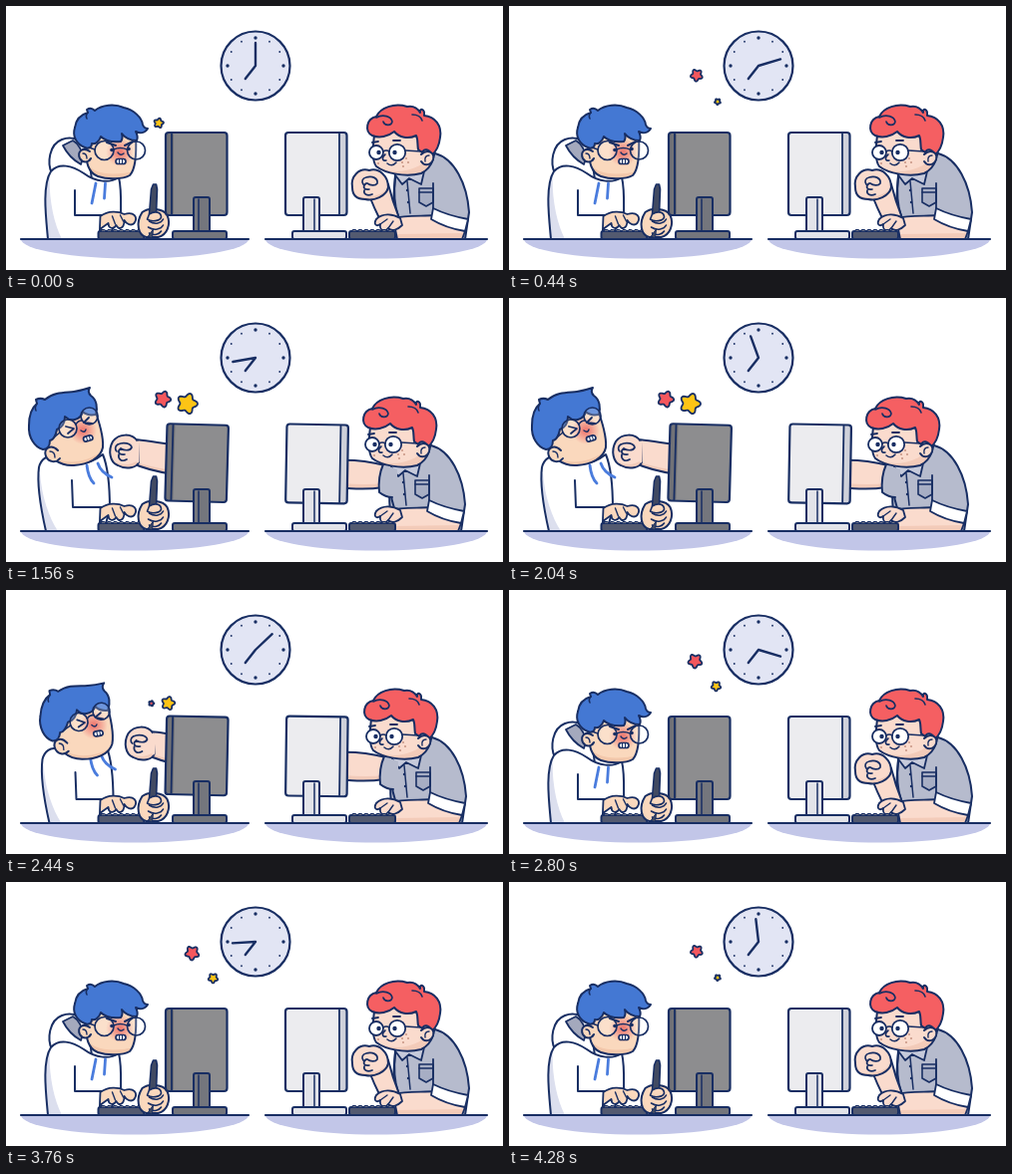
Animation, 498 px wide and 265 px high, one loop 4320 ms. Source, as an HTML page with a canvas:

```html
<!DOCTYPE html>
<html lang="en">
<head>
<meta charset="utf-8">
<title>Punch through the screen</title>
<style>
html,body{margin:0;width:100%;height:100%;overflow:hidden;background:#fff}
canvas{display:block;width:498px;height:265px}
</style>
</head>
<body>
<canvas id="stage"></canvas>
<script>
const W = 498, H = 265, LOOP = 4320, PUNCH = 480, STEP = 40;
const INK = '#182e63', SKIN = '#fad8bd', PALE = '#fadbcd', TAN = '#f4c8ab', ROSE = '#f3cbb9';
const BLUE = '#4478d3', RED = '#f55f62', SHIRT = '#b6bbcd';
const canvas = document.getElementById('stage');
const ctx = canvas.getContext('2d');
const dpr = window.devicePixelRatio || 1;
canvas.width = W * dpr;
canvas.height = H * dpr;
ctx.lineCap = ctx.lineJoin = 'round';

const cache = {};
const path = d => cache[d] || (cache[d] = new Path2D(d));

function paint(p, fill, width, color = INK) {
  if (fill) { ctx.fillStyle = fill; ctx.fill(p); }
  if (width) { ctx.strokeStyle = color; ctx.lineWidth = width; ctx.stroke(p); }
}
const shape = (d, fill, width = 2) => paint(path(d), fill, width);
const line = (d, width = 1.8, color = INK) => paint(path(d), null, width, color);

// Filled outline with a shadow kept inside it
function shaded(d, fill, shadow, tone, width = 2) {
  const p = path(d);
  paint(p, fill);
  ctx.save();
  ctx.clip(p);
  paint(path(shadow), tone);
  ctx.restore();
  paint(p, null, width);
}

function disc(x, y, r, fill, width = 0) {
  const p = new Path2D();
  p.arc(x, y, r, 0, 7);
  paint(p, fill, width);
}

function blush(x, y, r) {
  const g = ctx.createRadialGradient(x, y, 2, x, y, r);
  g.addColorStop(0, 'rgba(232,80,80,.65)');
  g.addColorStop(1, 'rgba(232,80,80,0)');
  disc(x, y, r, g);
}

function box(x, y, w, h, r, fill, width = 2) {
  const p = new Path2D();
  p.roundRect(x, y, w, h, r);
  paint(p, fill, width);
}

function group(dx, dy, deg, cx, cy, draw, stretch = 1) {
  ctx.save();
  ctx.translate(cx + dx, cy + dy);
  ctx.rotate(deg * Math.PI / 180);
  ctx.scale(1, stretch);
  ctx.translate(-cx, -cy);
  draw();
  ctx.restore();
}

// keys: [time, ...values], linear between neighbours
function at(keys, t) {
  let i = 0;
  while (i < keys.length - 2 && t > keys[i + 1][0]) i++;
  const a = keys[i], b = keys[i + 1];
  const k = Math.max(0, Math.min(1, (t - a[0]) / (b[0] - a[0])));
  return a.slice(1).map((v, j) => v + (b[j + 1] - v) * k);
}

const hitKeys = [[0, 0], [40, .75], [80, 1], [160, 1], [200, .9], [320, .1], [360, 0]];
const yellowKeys = [[0, 153, 117.5, 4.8], [120, 181.5, 106, 10.2], [260, 199, 99, 8.5], [400, 207.5, 96.5, 4.8], [440, 209, 96, 3], [480, 210, 96, 0]];
const redKeys = [[0, 140, 120, 0], [120, 157, 101.5, 8], [260, 176, 83, 8.5], [400, 186.5, 71.3, 7], [440, 188, 69.5, 6], [480, 190, 68, 4]];

function star(keys, t, fill, turn) {
  const [x, y, r] = at(keys, t);
  if (r < .5) return;
  const p = new Path2D();
  for (let i = 0; i <= 60; i++) {
    const a = i * Math.PI / 30;
    const d = r * (.86 + .17 * Math.cos(5 * a));
    p.lineTo(x + d * Math.sin(a + turn), y - d * Math.cos(a + turn));
  }
  p.closePath();
  paint(p, fill, 1.8);
}

function desk(x1, x2) {
  const p = new Path2D();
  p.ellipse((x1 + x2) / 2, 234, (x2 - x1) / 2, 19.5, 0, 0, Math.PI);
  paint(p, '#c2c6e8');
}

function clock(t) {
  disc(250, 60, 34.5, '#e2e5f4', 2.2);
  for (let i = 0; i < 12; i++) {
    const a = i * Math.PI / 6;
    disc(250 + 28 * Math.sin(a), 60 - 28 * Math.cos(a), i % 3 ? .9 : 1.7, INK);
  }
  const m = t * 4 * Math.PI / LOOP;
  const p = new Path2D('M250 60L239.8 73');
  p.moveTo(250, 60);
  p.lineTo(250 + 23 * Math.sin(m), 60 - 23 * Math.cos(m));
  paint(p, null, 2.4);
}

function keyboard(x) {
  box(x, 226, 46, 8, 2, '#535a70');
  for (let i = 0; i < 7; i++) box(x + 3 + i * 6, 224.5, 4, 2, 1, '#6d7387', 1);
}

// A hit pushes the panel over and foreshortens it
function monitor(x, edgeX, lineX, tones, hit, deg, squash) {
  group(1.5 * hit, 0, deg * hit, x + 30, 127, () => {
    box(x, 127, 61.5, 83, 3, tones[0], 0);
    box(edgeX, 127, 8, 83, 3, tones[1], 0);
    line(`M${lineX} 128V209`, 1.8);
    box(x, 127, 61.5, 83, 3, null, 2.2);
  }, 1 - squash * hit);
}

function stand(neck, base, fill, side) {
  box(neck, 192, 16, 36, 2, fill);
  line(`M${neck + side} 194V226`, 1.5);
  box(base, 226, 54, 8, 2, fill);
}

function calmHead() {
  shaded('M80 138C79 154 81 167 92 171C102 174.500 117 174 124 170C130 164 131 150 130 130L106 120L84 128Z', SKIN,
    'M78 156C88 170 108 171 132 165V178H76Z', TAN);
  blush(114, 147, 14);
  shape('M79 142C71 139 66 131 69 122C70 114 75 109 82 107L81 104C84 102 87 103 89 105C96 99 109 98 118 102C128 104 136 112 137 119C138 122 140 123 142 123C139 128 134 128 130 126C132 130 132 133 131 135C124 135 119 132 116 128C117 132 116 135 115 136C106 137 99 135 95 131C93 137 89 139 86 138C86 142 83 144 79 142Z', BLUE);
  line('M82 107C80 109 80 111 81 113', 1.6);
  shape('M84 146C77 141 71 146 74 153C77 158 83 157 85 153', SKIN);
  line('M77 148C80 148 81 150 81 153', 1.4);
  disc(98.5, 145, 9.5, 'rgba(255,255,255,.22)', 1.7);
  disc(130.5, 145, 9, 'rgba(255,255,255,.22)', 1.7);
  line('M108 144Q114 141 121.500 144M83 142L89 144', 1.6);
  disc(106, 144.5, 1.8, INK);
  disc(123, 143.5, 1.8, INK);
  line('M101 137L110 140M119 140L127 136', 2);
  line('M112 147Q115 151 118 148', 1.4);
  box(110, 153.5, 10, 5, 2.5, '#fff', 1.7);
  line('M113.500 154V158M116.500 154V158', 1);
}

function hurtHead() {
  shaded('M40 150C38 136 48 122 66 115L87 107C92 120 98 139 97 150C95 161 82 167 68 168C53 169 44 160 40 150Z', SKIN,
    'M38 152C52 169 78 168 99 152V172H38Z', TAN);
  blush(77, 133, 14);
  shape('M37 152C29 150 22 140 23 128C23 118 26 110 31 106L30 102C34 100 37 101 39 102C48 94 60 95 68 94C75 93 81 91 84 90C82 93 83 96 85 98C91 102 92 110 90 117C85 118 80 117 77 114C76 119 73 121 69 122C65 123 61 121 59 119C59 126 56 130 51 132C50 138 47 143 44 143C44 149 41 152 37 152Z', BLUE);
  line('M31 106C29 109 29 111 30 113', 1.6);
  shape('M52 153C45 146 37 151 40 159C43 165 50 166 54 161', SKIN);
  line('M44 154Q49 154 49 160', 1.4);
  disc(62, 131, 9, 'rgba(255,255,255,.22)', 1.7);
  disc(83.5, 118.5, 8.5, 'rgba(255,255,255,.22)', 1.7);
  line('M70 127Q72 123 76 123M48 140L54 135', 1.6);
  line('M60 129L68 131L62 136M83 120L78 125L86 126', 1.8);
  line('M75 133Q79 136 80 132', 1.4);
  group(0, 0, -15, 82, 141, () => {
    box(77.5, 138.5, 9.5, 5, 2.5, '#fff', 1.7);
    line('M81 139V143M84 139V143', 1);
  });
}

function calmBody() {
  shape('M46 168C41 158 43 139 56 134C66 130 77 134 82 146L86 174L62 178Z', '#fff');
  shape('M57 140L67 135C72 138 76 144 77 153L75 159C68 155 61 148 57 140Z', '#a4a9bd', 1.8);
  shaded('M42 234C40 212 36 180 45 166C53 157 66 160 78 168C90 177 104 178 113 172C116 184 115 198 115 212L100 234Z', '#fff',
    'M34 160H44C42 190 47 216 56 234H34Z', '#dcdfee');
  line('M69 185V210H96', 2);
  line('M90 178L86 198M99.500 178L98.500 193', 2.8, '#4a7cdd');
}

function hurtBody() {
  shaded('M40 234C35 212 31 185 33 170C35 162 41 157 49 160C65 169 82 169 97 157C102 169 104 184 104 212L98 234Z', '#fff',
    'M28 176H34C36 200 43 220 52 234H28Z', '#dcdfee');
  line('M66 183L67 210H96', 2);
  line('M81 168C82 177 84 182 88 186M92 166C94 172 99 177 106 180', 2.8, '#4a7cdd');
}

function leftHands() {
  shape('M95 234L96 211C104 205 114 206 120 209C130 206 134 212 130 218C127 221 122 219 120 215C120 224 114 225 112 220C109 225 104 223 104 218L97 223Z', SKIN, 1.8);
  line('M108 211L111 219M116 210L119 216', 1.4);
  keyboard(94);
  shape('M138 207C145 202 159 203 163 210C167 219 163 230 154 232H142C134 230 131 218 138 207Z', SKIN);
  shape('M149 179H152L153 184L152 209H145L147 184Z', '#414a62', 1.6);
  shape('M145 209C151 205 157 207 157 212C156 216 147 217 143 214Z', SKIN, 1.6);
  line('M145 216C151 220 157 218 159 214M144 222C150 226 157 224 159 220M145 228C150 231 155 229 157 226', 1.6);
  shape('M144 231L149 224L148 233Z', '#414a62', 1);
}

function fistThrough(hit) {
  if (!hit) return;
  ctx.save();
  ctx.beginPath();
  ctx.rect(0, 0, 170, H);
  ctx.clip();
  ctx.translate((1 - hit) * 62, 0);
  shaded('M127 142C140 142 190 152 230 156V183C190 181 150 177 127 166Z', PALE,
    'M124 163C150 172 190 177 230 179V190H124Z', ROSE);
  shaded('M132 144C126 135 113 136 107 144C102 153 104 165 112 168C121 173 131 170 133 165Z', PALE,
    'M103 161C114 170 125 168 134 162V175H103Z', ROSE);
  line('M132 145V164', 3, PALE);
  line('M112 147C118 144 125 146 126 150C124 154 118 153 115 151M115 151C111 154 113 158 119 157M113 157C112 162 116 165 121 162M112 147C109 149 109 152 111 154', 1.7);
  ctx.restore();
}

function rightBody() {
  shape('M390 170C403 166 420 160 430 148C449 153 462 178 464 207L460 234H394C386 216 388 194 390 170Z', SHIRT);
  line('M390 172C388 190 389 200 393 211', 2);
  shape('M388 167L397 179L404 173L416 179L419 166Z', '#c6cadb', 1.8);
  line('M402 176L405 208', 1.5);
  disc(402, 185, 1.2, INK);
  disc(403, 197, 1.2, INK);
  shape('M414 183H428V197L421 201L414 197Z', '#a7aec4', 1.6);
  line('M414 187H428', 1.4);
  line('M428 178V205', 1.8);
  shaded('M388 213C400 210 416 211 430 210L460 226L457 234H392Z', PALE, 'M390 229L460 228V238H390Z', ROSE, 1.8);
  shape('M428 203C438 208 452 212 463 214L460 226C447 224 436 220 426 214Z', '#fff', 1.8);
}

function rightHand() {
  shape('M395 213C387 208 377 208 371 214C368 219 371 222 375 219C374 226 380 227 383 223C387 227 393 224 397 220Z', PALE, 1.8);
  line('M382 214L375 219M388 216L383 223', 1.4);
  keyboard(344);
}

function bentArm() {
  shape('M363 188C367 198 371 207 375 215L394 213C390 203 386 191 383 179Z', PALE);
  shaded('M347 182C345 171 354 162 364 165C374 162 383 171 383 182C381 191 369 196 360 194C352 194 347 190 347 182Z', PALE,
    'M345 187C355 195 372 193 384 183V198H345Z', ROSE);
  line('M361 172C367 170 373 173 372 178C370 181 365 180 362 178M361 178C357 181 358 185 364 184M359 185C358 189 362 191 367 189M361 172C357 173 356 176 358 179', 1.7);
}

function straightArm() {
  shaded('M325 164C345 161 364 163 384 168L382 190C363 193 345 191 325 189Z', PALE,
    'M325 184C345 187 365 188 382 186V196H325Z', ROSE);
  shape('M382 167L396 172V201C389 201 383 199 378 195C377 185 378 176 382 167Z', SHIRT, 0);
  line('M382 167C378 176 377 185 378 195C383 199 388 200 391 200', 2);
}

function redHead() {
  shaded('M369 130C367 145 367 156 371 161C380 168 400 172 416 168C428 162 432 148 428 130L400 119Z', PALE,
    'M370 160C386 170 410 167 424 153L434 150V176H365Z', ROSE);
  shape('M367 130C359 126 361 113 371 111C375 102 389 97 402 101C407 100 412 102 415 107C414 102 420 103 419 110C430 111 437 120 435 132C434 140 431 146 427 149C423 143 419 143 417 147L413 144C412 139 413 134 411 130C403 134 394 132 389 126C383 131 374 133 367 130Z', RED);
  line('M371 112C378 108 386 111 387 116C386 121 379 120 378 116M407 109C413 109 416 112 417 115', 1.6);
  shape('M416 149C422 143 430 147 428 154C426 160 419 161 416 156', PALE);
  line('M424 150Q419 150 420 156', 1.4);
  disc(371, 147, 7, '#fff', 1.8);
  disc(392, 147, 8.2, '#fff', 1.8);
  disc(373.5, 147, 2.2, INK);
  disc(389.5, 147, 2.2, INK);
  line('M378 146Q381 144 384 146M400 145L416 146', 1.6);
  line('M380 149C376 152 377 156 381 155M382 158Q387 162 391 157', 1.6);
  line('M367 137L373 136M388 135L395 135', 1.8);
  for (const [x, y] of [[397, 157], [401, 153], [403, 157], [398, 161], [373, 158]]) disc(x, y, .8, '#a3604f');
}

function scene(t) {
  const beat = t % PUNCH;
  const hit = at(hitKeys, beat)[0];
  const struck = hit > .4;
  ctx.setTransform(dpr, 0, 0, dpr, 0, 0);
  ctx.fillStyle = '#fff';
  ctx.fillRect(0, 0, W, H);
  desk(15, 243);
  desk(260, 482);
  clock(t);

  const rest = 1 - hit;
  if (struck) {
    group(rest * 14, 0, 0, 0, 0, hurtBody);
    group(rest * 43, rest * 6, rest * 18, 62, 135, hurtHead);
  } else {
    group(-hit * 10, 0, 0, 0, 0, calmBody);
    group(-hit * 43, -hit * 6, -hit * 18, 105, 140, calmHead);
  }
  fistThrough(hit);
  group(-1.5, 0, 0, 0, 0, leftHands);
  monitor(160, 160, 166, ['#8d8d8f', '#717277'], hit, 1.6, .07);
  stand(188, 167, '#74767d', 5);

  group(-4 * hit, 0, 0, 0, 0, () => {
    rightBody();
    if (struck) straightArm();
    redHead();
    if (!struck) bentArm();
  });
  rightHand();
  monitor(280, 334, 334, ['#ececef', '#cfd1da'], hit, 1, .05);
  stand(298, 287, '#e2e3e9', 11);
  line('M15 234H243M260 234H482', 2.2);

  star(redKeys, beat, '#f4575d', .25 + beat / 900);
  star(yellowKeys, beat, '#fdc415', .2 + beat / 900);
}

function frame(now) {
  scene(Math.floor(now % LOOP / STEP) * STEP);
  requestAnimationFrame(frame);
}
scene(0);
requestAnimationFrame(frame);
</script>
</body>
</html>
```
